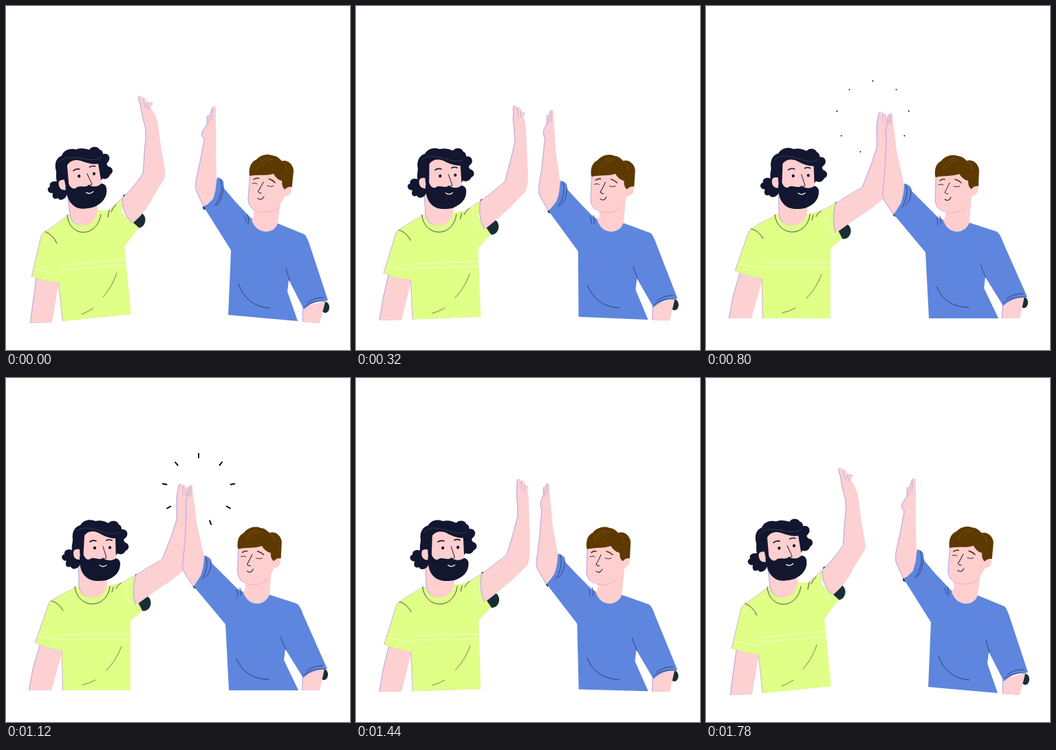
These frames come from a looping animation (500x500 px, 1.8 s). An HTML page with a canvas:

```html
<!DOCTYPE html>
<html lang="en">
<head>
<meta charset="utf-8">
<title>High five</title>
<style>
html, body { margin: 0; width: 100%; height: 100%; overflow: hidden; background: #fff; }
canvas { display: block; width: 500px; height: 500px; }
</style>
</head>
<body>
<canvas id="stage" width="500" height="500"></canvas>
<script>
const ctx = document.getElementById('stage').getContext('2d');
const LOOP = 1800;
const SKIN = '#ffcfd0', ARM = '#fdd0d2', EDGE = '#c5b0e2', HEM = '#dcbfd8';
const LIME = '#dfff87', STRIPE = '#f3ffd6', BLUE = '#5e86de', FOLD = '#25375f';
const NAVY = '#12162f', BROWN = '#5d3900', CUFF = '#1a2d35', INK = '#1d2233';

const clamp = x => Math.max(0, Math.min(1, x));
const smooth = x => { x = clamp(x); return x * x * (3 - 2 * x); };
const lerp = (a, b, p) => a + (b - a) * p;

// Eased value from [time, value] keys.
function track(keys, t) {
  for (let i = 1; i < keys.length; i++) {
    const [t0, v0] = keys[i - 1], [t1, v1] = keys[i];
    if (t <= t1) return lerp(v0, v1, smooth((t - t0) / (t1 - t0)));
  }
  return keys[keys.length - 1][1];
}

const LEFT_BODY = [[0, 0], [560, 1], [1240, 1], [1800, 0]];
const RIGHT_BODY = [[0, 0], [620, 1], [1240, 1], [1800, 0]];
const LEFT_HEAD = [[0, 0], [500, 1], [800, .9], [1120, 1], [1340, 1], [1800, 0]];
const RIGHT_HEAD = [[0, 0], [580, 1], [820, 1], [1120, .82], [1380, .95], [1800, 0]];

// Blend two path strings that share the same commands.
function blend(a, b, p) {
  const end = b.match(/-?[\d.]+/g);
  let i = 0;
  return a.replace(/-?[\d.]+/g, n => lerp(+n, +end[i++], p).toFixed(2));
}

function fill(d, color, edge) {
  const path = new Path2D(d);
  if (edge) {
    ctx.save();
    ctx.translate(-1.4, 0);
    ctx.fillStyle = edge;
    ctx.fill(path);
    ctx.restore();
  }
  ctx.fillStyle = color;
  ctx.fill(path);
}

function line(d, color = INK, width = 1) {
  ctx.strokeStyle = color;
  ctx.lineWidth = width;
  ctx.stroke(new Path2D(d));
}

function oval(x, y, rx, ry, color) {
  ctx.fillStyle = color;
  ctx.beginPath();
  ctx.ellipse(x, y, rx, ry, 0, 0, Math.PI * 2);
  ctx.fill();
}

function posed(cx, cy, dx, dy, deg, draw) {
  ctx.save();
  ctx.translate(cx + dx, cy + dy);
  ctx.rotate(deg * Math.PI / 180);
  ctx.translate(-cx, -cy);
  draw();
  ctx.restore();
}

function burst(x, y, start, t) {
  const u = (t - start) / 345;
  if (u < 0 || u > 1) return;
  const outer = 53 * smooth(u / .75), inner = 53 * smooth((u - .1) / .9);
  for (let i = 0; i < 9; i++) {
    const a = i * Math.PI * 2 / 9, s = Math.sin(a), c = -Math.cos(a);
    line(`M${x + s * inner} ${y + c * inner}L${x + s * outer} ${y + c * outer}`, '#000', 1.9);
  }
}

function leftBody(p) {
  const m = (a, b) => blend(a, b, p);
  fill(m('M45 394L77 400L67 460L36 461L40 430Z',
         'M50 388L83 394L66 454L34 454L40 422Z'), ARM, EDGE);
  oval(lerp(192, 200, p), 327 - 16 * (1 - p), 10.5, 11.5, CUFF);
  oval(lerp(173, 190, p), lerp(277, 288, p), 3, 3, CUFF);
  fill(m('M92 303L75 316L56 329Q51 334 50 342L38 393Q56 400 77 402L83 458L182 448L172 350L193 322L168 300L171 278L150 297L133 297Z',
         'M104 303L82 314L67 323Q63 326 61 333L43 385Q60 393 82 396L83 454L181 454L181 353L198 338L184 310L190 286L167 298L151 302Z'), LIME, HEM);
  fill(m('M90 270L94 305Q98 320 115 319Q130 317 133 297L133 280Z',
         'M106 268L107 303Q110 319 127 319Q143 318 147 300L147 280Z'), SKIN, EDGE);
  line(m('M89 304C92 337 132 338 138 303', 'M100 303C104 337 147 337 151 303'), INK, .8);
  line(m('M57 328Q68 332 74 345', 'M66 324Q76 326 83 338'), INK, .8);
  line(m('M79 377L172 368M80 384L174 376M42 383L76 389', 'M84 373L181 373M84 380L181 380M47 375L82 381'), STRIPE, .9);
  line(m('M162 287Q162 308 180 322', 'M175 295Q171 318 187 334'), STRIPE, .9);
  line(m('M161 388Q154 409 141 423M127 439Q120 444 110 448',
         'M168 390Q160 411 146 425M130 439Q121 444 111 446'), '#59653f', .8);
  line(m('M150 297L148 307M160 289Q155 293 153 299', 'M156 304L154 311M167 298Q162 301 160 306'), INK, .8);
}

function leftArm(p) {
  const m = (a, b) => blend(a, b, p);
  const finger = m('M206 147L211 142', 'M259 171L264 166');
  line(finger, EDGE, 4);
  line(finger, ARM, 2.5);
  fill(m('M170 279Q188 262 200 243L202 212L204 190L203 172L220 165L226 210L231 238Q233 247 229 253L215 275Q206 297 185 315Q169 302 170 279Z',
         'M189 287Q208 274 228 263L241 230L249 205L249 184L264 184L263 215L262 245Q262 272 257 281L238 296Q216 310 189 330Q183 310 189 287Z'), ARM, EDGE);
  fill(m('M203 176L198 156L196 143Q192 134 194 131Q197 129 199 135L200 139Q198 132 202 133Q204 136 206 142Q207 138 210 140L211 149L216 157L220 168Z',
         'M249 188L249 172L251 160Q252 154 254 154Q257 153 257 157L258 161Q258 155 260 156Q262 157 262 162Q263 160 264 164L265 169L265 177L264 190Z'), ARM, EDGE);
  line(m('M199 137L204 149M205 141L208 150', 'M257 158L257 170M261 160L261 171'), EDGE, 1);
}

function leftHead(h) {
  const q = 1 - h;
  posed(139, 246, -23 * q, -q, -8 * q, () => {
    fill('M106 274C101 279 95 278 94 274C88 277 85 271 88 266C80 266 79 257 85 256C84 250 90 248 96 250C95 244 97 239 97 235C95 222 102 215 108 214C113 205 124 205 130 208C138 206 145 209 149 211C153 206 162 207 164 213C167 214 168 217 168 220C176 219 179 227 174 232C170 235 171 236 173 239C180 241 180 249 174 251C171 257 165 257 162 255L158 260L112 264Z', NAVY);
    fill('M112 267L114 229C121 220 132 223 138 227C146 231 152 233 159 233L160 268Z', SKIN);
    fill('M107 249Q97 247 98 256Q99 265 108 264Z', SKIN);
    fill('M107 260C107 274 109 282 115 288C122 296 135 296 146 294C157 290 166 283 166 270Q166 264 160 262C152 267 147 265 141 262C135 265 131 261 124 262C118 267 114 261 112 255Z', NAVY);
    line('M103 223Q109 217 119 218T143 224T165 224', '#414865', .7);
    line('M122 238Q126 235 131 237M146 236Q150 234 154 236', NAVY, 1.7);
    oval(129, 247, 2.1, 2.3, NAVY);
    oval(151, 246.5, 2.1, 2.3, NAVY);
    line('M141 245L146 261Q144 263 140 262', INK, 1);
    line('M136 272Q141 276 146 272', '#fff', 1.3);
  });
}

function rightBody(p) {
  const m = (a, b) => blend(a, b, p);
  oval(lerp(289, 275, p), lerp(292, 302, p), 3, 4, CUFF);
  oval(lerp(464, 462, p), lerp(438, 431, p), 6, 8, CUFF);
  fill(m('M432 438L464 430L456 461L432 459Z', 'M432 432L463 422L456 454L431 454Z'), ARM, EDGE);
  fill(m('M307 249Q313 250 316 255L317 265L333 284L351 303L357 309L379 322L395 316L434 332Q438 336 443 352L468 428Q446 428 433 441L411 398L409 415L424 458L323 449L327 355L288 293L301 280Z',
         'M288 258Q294 259 298 264L299 269L318 288L336 306L345 311L366 322L383 315L423 328Q428 332 432 344L467 423Q445 423 432 436L406 394L404 410L425 454L324 454L319 358L273 303L283 285Z'), BLUE);
  fill(m('M358 290L360 300Q361 307 357 311Q363 328 379 328Q391 327 395 316L402 265Z',
         'M347 290L348 300Q348 308 345 312Q351 328 366 328Q378 327 383 315L387 265Z'), SKIN);
  line(m('M338 404Q350 437 383 439', 'M335 408Q348 438 382 438'), FOLD, .9);
  line(m('M407 381Q409 389 412 399', 'M399 376Q402 385 407 395'), FOLD, .8);
  line(m('M434 437Q446 427 465 429M438 431Q448 423 462 424', 'M432 432Q444 422 464 423M436 426Q447 418 461 418'), FOLD, .8);
  line(m('M312 252Q318 270 304 290M316 264Q315 281 306 290', 'M291 260Q295 276 285 293M298 267Q299 283 289 290'), FOLD, .8);
  line(m('M346 305Q350 309 349 314M351 303Q354 310 352 317', 'M335 308Q338 312 336 318M340 305Q343 311 341 316'), FOLD, .8);
}

function rightArm(p) {
  const m = (a, b) => blend(a, b, p);
  fill(m('M305 180L305 210L306 250Q306 270 300 281L288 292L278 270Q275 264 277 253L283 225L290 188Z',
         'M274 182L277 210L288 259Q288 274 283 287L273 303L260 283Q256 276 258 266L261 235L263 188Z'), ARM, EDGE);
  fill(m('M290 195L286 190Q284 184 289 178L293 172L293 161Q295 157 297 159L300 149Q303 144 305 147L305 165L305 195Z',
         'M263 194L262 185Q262 177 264 173L265 168L265 160Q266 156 267 159L268 157Q270 154 271 157L272 172L275 195Z'), ARM, EDGE);
  line(m('M297 159L294 171M301 150L299 165', 'M267 159L266 172M269 158L269 172'), EDGE, 1);
}

function rightHead(h) {
  const q = 1 - h;
  posed(365, 258, 20 * q, -.5 * q, 3 * q, () => {
    fill('M335 240L334 283C335 294 343 300 354 300C368 301 381 292 386 276C394 276 397 269 395 261L380 240Z', SKIN, EDGE);
    line('M349 300Q365 303 377 293', '#f5b6bc', 1.2);
    fill('M333 247C332 237 334 229 342 225C348 217 359 215 366 218C372 218 376 222 379 225C387 222 396 229 397 238L396 262Q390 261 386 266Q381 264 381 254Q374 253 368 244C359 248 345 246 334 249Z', BROWN);
    line('M345 238Q346 225 361 221M351 234Q355 225 366 223M379 226Q387 230 387 238', '#80602f', .7);
    line('M340 254Q343 251 347 252M362 252Q367 253 371 257', BROWN, 1.6);
    line('M338 260Q342 258 345 260M360 262Q365 264 369 262', INK, .9);
    line('M354 257Q350 266 347 271Q349 274 352 273', INK, 1);
    line('M347 281Q353 285 356 278', INK, 1.1);
  });
}

function frame(now) {
  const t = now % LOOP;
  ctx.fillStyle = '#fff';
  ctx.fillRect(0, 0, 500, 500);
  ctx.lineCap = ctx.lineJoin = 'round';
  const left = track(LEFT_BODY, t), right = track(RIGHT_BODY, t);
  burst(242.5, 162, 460, t);
  burst(280, 163, 840, t);
  leftBody(left);
  rightBody(right);
  leftArm(left);
  rightArm(right);
  leftHead(track(LEFT_HEAD, t));
  rightHead(track(RIGHT_HEAD, t));
}

const begin = performance.now();
function tick() {
  frame(performance.now() - begin);
  requestAnimationFrame(tick);
}
tick();
</script>
</body>
</html>
```
